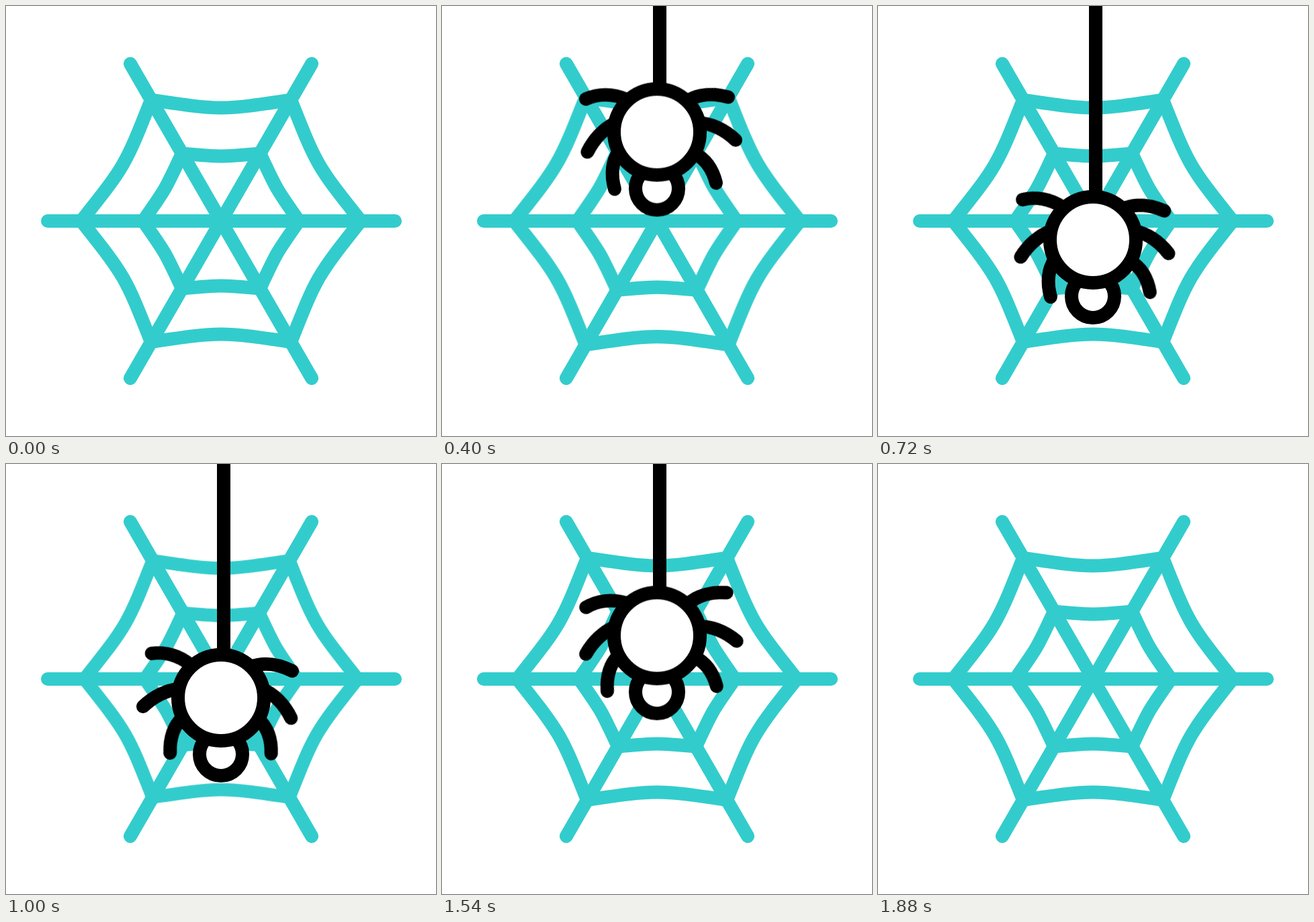
Animation, 640 px wide and 640 px high, one loop 2.4 s. Source, as an HTML page:

```html
<!DOCTYPE html>
<html lang="en">
<head>
<meta charset="utf-8">
<title>Spider and web</title>
<style>
  html, body { margin: 0; width: 100%; height: 100%; overflow: hidden; background: #fff; }
  svg { display: block; width: 100vw; height: 100vh; }

  .web, .spider { fill: none; stroke-width: 20; }
  .web { stroke: #3cc; stroke-linejoin: bevel; }
  .spider { stroke: #000; }
  .spokes, .leg { stroke-linecap: round; }
  .solid { fill: #fff; }

  .rings, .spider, .leg { animation: 2400ms infinite; }
  .rings, .spider { animation-timing-function: cubic-bezier(.333, 0, .667, 1); }
  .leg { animation-timing-function: linear; }

  .rings { animation-name: stretch; }
  .spider { animation-name: drop; }
  .lt { animation-name: left-top; }
  .lm { animation-name: left-mid; }
  .ll { animation-name: left-low; }
  .rt { animation-name: right-top; }
  .rm { animation-name: right-mid; }
  .rl { animation-name: right-low; }

  @keyframes stretch {
    0%, 10% { transform: scale(1); }
    24.17% { transform: scale(1.046); }
    35.83% { transform: scale(.955); }
    47.5%, 100% { transform: scale(1); }
  }
  @keyframes drop {
    0% { transform: translateY(-494px); }
    26.46%, 57.5% { transform: translateY(28px); }
    82.5%, 100% { transform: translateY(-494px); }
  }
  @keyframes left-top {
    0%, 5% { transform: rotate(-6deg); }
    16.67% { transform: rotate(0deg); }
    30% { transform: rotate(10deg); }
    41.67% { transform: rotate(16deg); }
    50% { transform: rotate(17deg); }
    57.5% { transform: rotate(16deg); }
    64.17%, 100% { transform: rotate(-6.5deg); }
  }
  @keyframes left-mid {
    0%, 16.67% { transform: rotate(-20deg); }
    30% { transform: rotate(-14.5deg); }
    41.67% { transform: rotate(0deg); }
    50% { transform: rotate(6deg); }
    57.5% { transform: rotate(-4deg); }
    64.17% { transform: rotate(-17deg); }
    72.5%, 100% { transform: rotate(6deg); }
  }
  @keyframes left-low {
    0%, 30% { transform: rotate(0deg); }
    41.67% { transform: rotate(13.3deg); }
    50% { transform: rotate(15deg); }
    57.5% { transform: rotate(9deg); }
    64.17% { transform: rotate(11.4deg); }
    72.5%, 100% { transform: rotate(13deg); }
  }
  @keyframes right-top {
    0%, 5% { transform: rotate(-20deg); }
    16.67% { transform: rotate(-11.4deg); }
    30% { transform: rotate(-3deg); }
    41.67% { transform: rotate(0deg); }
    50% { transform: rotate(1deg); }
    57.5% { transform: rotate(0deg); }
    64.17% { transform: rotate(-23deg); }
    72.5%, 100% { transform: rotate(-20deg); }
  }
  @keyframes right-mid {
    0%, 5% { transform: rotate(-4deg); }
    16.67% { transform: rotate(0deg); }
    30% { transform: rotate(8.7deg); }
    41.67% { transform: rotate(20.5deg); }
    50% { transform: rotate(21.5deg); }
    57.5% { transform: rotate(20.5deg); }
    64.17% { transform: rotate(-3.7deg); }
    72.5%, 100% { transform: rotate(-6deg); }
  }
  @keyframes right-low {
    0%, 5% { transform: rotate(-1deg); }
    16.67% { transform: rotate(0deg); }
    30% { transform: rotate(4deg); }
    41.67% { transform: rotate(16deg); }
    50% { transform: rotate(17deg); }
    57.5% { transform: rotate(16deg); }
    64.17%, 100% { transform: rotate(-1deg); }
  }
</style>
</head>
<body>
<svg viewBox="0 0 640 640">
  <g transform="translate(320 320)">
    <g class="web">
      <path class="spokes" d="M-258 0H259M-135-234L135 234M135-234L-135 234"/>
      <g class="rings">
        <path d="M-208 0C-142.6-82.4-142.6-82.4-104-180.1C0-164.7 0-164.7 104-180.1C142.6-82.4 142.6-82.4 208 0C142.6 82.4 142.6 82.4 104 180.1C0 164.7 0 164.7-104 180.1C-142.6 82.4-142.6 82.4-208 0Z"/>
        <path d="M-116 0C-82.4-47.6-82.4-47.6-58-100.5C0-95.2 0-95.2 58-100.5C82.4-47.6 82.4-47.6 116 0C82.4 47.6 82.4 47.6 58 100.5C0 95.2 0 95.2-58 100.5C-82.4 47.6-82.4 47.6-116 0Z"/>
      </g>
    </g>

    <g class="spider">
      <path d="M4-64V-900"/>
      <g transform="translate(-44 -48)"><path class="leg lt" d="M0 0Q-32-14-62-1"/></g>
      <g transform="translate(-62 -14)"><path class="leg lm" d="M2 0Q-30 4-54 27"/></g>
      <g transform="translate(-57 29)"><path class="leg ll" d="M0 0Q-15 23-6 56"/></g>
      <g transform="translate(46 -46)"><path class="leg rt" d="M-2 0Q26-11 60 6"/></g>
      <g transform="translate(60 -14)"><path class="leg rm" d="M0 0Q32 2 57 26"/></g>
      <g transform="translate(56 32)"><path class="leg rl" d="M0 0Q24 12 32 44"/></g>
      <circle class="solid" cy="84" r="32"/>
      <circle class="solid" r="64"/>
    </g>
  </g>
</svg>
</body>
</html>
```
